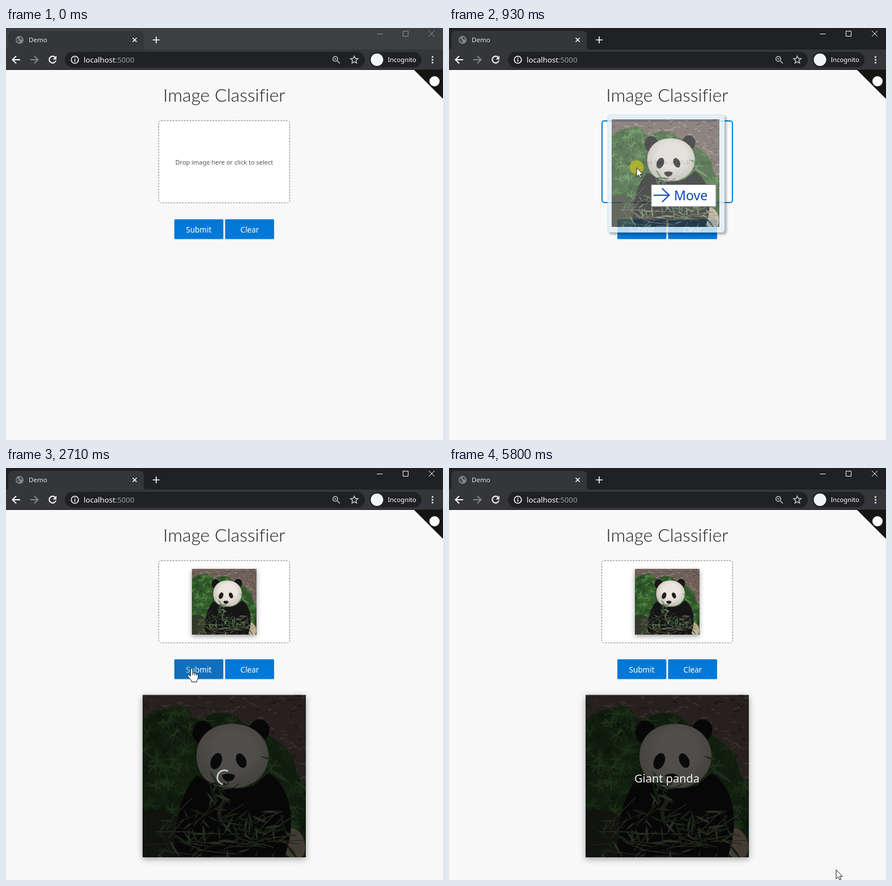
An HTML page for the animation above (5890 ms loop, 771 px wide and 727 px high).

```html
<!DOCTYPE html>
<html lang="en">
<head>
<meta charset="utf-8">
<title>Demo</title>
<style>
  html, body { margin: 0; width: 100%; height: 100%; overflow: hidden; background: #f8f8f8; }
  svg { display: block; font-family: "Noto Sans", "Open Sans", sans-serif; }
  .line { fill: none; stroke: #fff; stroke-width: 2; }
  .mid { text-anchor: middle; }
  .title { font: 300 32px Lato, "Open Sans", sans-serif; font-variant-ligatures: none; }
  .lift { filter: drop-shadow(0 3px 4px rgba(0,0,0,.38)); }
  .cursor { fill: #fff; stroke: #111; stroke-width: 1; stroke-linejoin: round; }
  #zone { box-sizing: border-box; height: 146px; border-radius: 5px; background: #fff; }
</style>
</head>
<body>
<svg width="771" height="727" viewBox="0 0 771 727">
  <defs>
    <clipPath id="bushClip"><path id="bush" d="M0 45Q15 25 42 26Q70 14 84 30Q90 50 112 38Q150 20 178 50Q215 65 232 78Q268 100 272 140L288 160V287H0Z"/></clipPath>
    <radialGradient id="fur" cx=".52" cy=".4" r=".62">
      <stop offset=".45" stop-color="#ebe6df"/>
      <stop offset="1" stop-color="#c2bab0"/>
    </radialGradient>
    <symbol id="photo" viewBox="0 0 288 287" preserveAspectRatio="none">
      <rect width="288" height="287" fill="#6f6159"/>
      <g id="mulch"></g>
      <use href="#bush" fill="#2f5429"/>
      <g id="needles" clip-path="url(#bushClip)"></g>
      <path d="M0 287V205Q40 195 75 225V287Z" fill="#33392a"/>
      <ellipse cx="266" cy="263" rx="20" ry="29" fill="#c4b199" transform="rotate(-18 266 263)"/>
      <path d="M96 142C72 165 54 215 57 287H250C270 240 268 165 222 138L196 160Q150 176 96 142Z" fill="#151517"/>
      <path d="M147 185Q130 200 138 222" fill="none" stroke="#5b5348" stroke-width="7"/>
      <ellipse cx="106" cy="66" rx="18" ry="21" fill="#171618"/>
      <ellipse cx="206" cy="62" rx="18" ry="19" fill="#171618"/>
      <path d="M95 110C94 73 122 51 158 51C197 51 222 76 222 108C222 139 196 165 157 165C120 165 97 145 95 110Z" fill="url(#fur)"/>
      <ellipse cx="130" cy="117" rx="9.500" ry="15" fill="#1f1d1e" transform="rotate(22 130 117)"/>
      <ellipse cx="174" cy="116" rx="8.500" ry="13.500" fill="#1f1d1e" transform="rotate(-24 174 116)"/>
      <path d="M140 142Q151 136 163 142Q162 152 151 153Q142 152 140 142Z" fill="#1d1b1b"/>
      <path d="M151 153V159M142 160Q157 170 170 157" fill="none" stroke="#75665d" stroke-width="2"/>
      <g id="leaves"></g>
    </symbol>
  </defs>

  <rect width="771" height="727" fill="#f8f8f8"/>

  <!-- browser window -->
  <rect id="titlebar" width="771" height="40"/>
  <path d="M0 38Q4 38 4 32V13Q4 5 12 5H235Q243 5 243 13V32Q243 38 248 38H771V74H0Z" fill="#35363a"/>
  <rect y="73" width="771" height="1" fill="#202124"/>
  <circle cx="24" cy="21" r="7" fill="#80868b"/>
  <path d="M19 18Q23 19 23 22Q25 23 23 26Q19 24 18.500 21ZM24 16Q28 16 29 20Q26 21 24 19Z" fill="#45474b"/>
  <text x="40" y="25" font-size="11.500" fill="#e4e6e8">Demo</text>
  <path class="line" style="stroke-width:1.6" d="M223.500 17.500l7 7m0-7l-7 7M259 21h12m-6-6v12"/>
  <path id="winButtons" fill="none" d="M654.500 10.500h10M700.500 5.500h9v9h-9zM746 5l10 10m0-10l-10 10"/>
  <path class="line" d="M25 56H12m6-6.500L11.500 56l6.500 6.500"/>
  <path class="line" style="stroke:#85878b" d="M43 56h13m-6-6.500l6.500 6.500-6.500 6.500"/>
  <path class="line" d="M87 52A6 6 0 1 0 88 57.500"/>
  <path d="M89 49v6.500h-6.500z" fill="#fff"/>
  <rect x="104" y="42" width="529" height="28" rx="14" fill="#202124"/>
  <circle class="line" style="stroke-width:1.6" cx="121.500" cy="56" r="6.300"/>
  <path class="line" style="stroke-width:1.6" d="M121.500 55v4.500m0-7.500v1.700"/>
  <text x="137" y="60.500" font-size="13.200" fill="#fff">localhost<tspan fill="#9aa0a6">:5000</tspan></text>
  <g class="line" style="stroke:#c4c7cb;stroke-width:1.5">
    <circle cx="581" cy="54.500" r="4.300"/>
    <path d="M584.500 58l4.500 4.500M579 54.500h4"/>
    <path d="M614.500 49.500l1.900 4.300 4.700.4-3.600 3.100 1.100 4.600-4.100-2.400-4.100 2.400 1.100-4.600-3.600-3.100 4.700-.4z"/>
  </g>
  <rect x="641" y="42.500" width="92" height="27" rx="13.500" fill="#202124"/>
  <circle cx="654.500" cy="56" r="11" fill="#f1f3f4"/>
  <text x="673.500" y="60" font-size="11.200" font-weight="500" fill="#fff">Incognito</text>
  <g fill="#fff"><circle cx="752.500" cy="51" r="1.600"/><circle cx="752.500" cy="56" r="1.600"/><circle cx="752.500" cy="61" r="1.600"/></g>

  <!-- page -->
  <path d="M720 74H771V125Z" fill="#151513"/>
  <circle cx="756" cy="94" r="9" fill="#fff"/>
  <text class="mid title" x="385" y="130" fill="#1b1b24">Image Classifier</text>
  <foreignObject x="269" y="163" width="232" height="146"><div id="zone"></div></foreignObject>
  <text id="hint" class="mid" x="385" y="241" font-size="11" fill="#555">Drop image here or click to select</text>
  <use id="thumb" class="lift" href="#photo" x="328" y="178" width="114" height="116"/>
  <rect id="submit" x="297" y="337.500" width="86.500" height="35" rx="1.500"/>
  <rect x="386.500" y="337.500" width="86.500" height="35" rx="1.500" fill="#0078d7"/>
  <g class="mid" font-size="13.500" fill="#fff">
    <text x="340" y="360.500">Submit</text>
    <text x="430" y="360.500">Clear</text>
  </g>
  <g id="result">
    <use style="filter:drop-shadow(0 3px 6px rgba(0,0,0,.35))" href="#photo" x="241" y="400.500" width="288" height="286.500"/>
    <rect id="shade" x="241" y="400.500" width="288" height="286.500" fill="rgba(0,0,0,.66)"/>
  </g>
  <circle id="spinner" cx="385.500" cy="546" r="12.600" fill="none" stroke="#ccc" stroke-width="2.700" pathLength="360"/>
  <text id="label" class="mid" x="384.500" y="554.500" font-size="20" fill="#f2f2f2">Giant panda</text>

  <!-- dragged picture -->
  <g id="ghost">
    <g opacity=".83">
      <rect width="206" height="207" rx="4" fill="#e2eff6" stroke="#bfe0f1" style="filter:drop-shadow(3px 3px 2px rgba(0,0,0,.4))"/>
      <use href="#photo" x="7" y="7.500" width="190" height="190"/>
      <rect x="7" y="7.500" width="190" height="190" fill="rgba(170,175,175,.16)"/>
    </g>
    <circle cx="51" cy="92" r="12.300" fill="#b3b62c" opacity=".9"/>
    <g font-size="23.200" fill="#0a46b8">
      <g id="copy">
        <rect x="77" y="123" width="107" height="38.500" fill="#fff" stroke="#888"/>
        <path d="M84 142h24m-12-12v24" stroke="#0a46b8" stroke-width="3"/>
        <text x="116" y="150">Copy</text>
      </g>
      <g id="move">
        <rect x="77" y="123" width="114" height="38.500" fill="#fff" stroke="#888"/>
        <path d="M81 141.500h27m-12-12l12.500 12-12.500 12" fill="none" stroke="#0a46b8" stroke-width="2"/>
        <text x="117" y="150">Move</text>
      </g>
    </g>
  </g>

  <circle id="click" cx="327" cy="356" r="11.500"/>
  <path id="arrow" class="cursor" d="M0 0V16L3.700 12.500L6.200 18L8.600 17L6.200 11.500H11Z"/>
  <g id="hand" class="cursor">
    <path d="M-2 2Q-2 0 0 0Q2 0 2 2V8Q5 7 5.500 9Q8 8 8.500 10Q11 9.500 11.500 12V16Q11 20 9 22V24H0V22Q-4 18 -7 13.500Q-8 11 -5.500 11Q-4 11.500 -2 14Z"/>
    <path d="M2 8v4M5.300 9v3.500M8.500 10v3" fill="none"/>
  </g>
</svg>
<script>
const $ = id => document.getElementById(id);
const show = (id, on) => $(id).style.display = on ? '' : 'none';
const place = (id, x, y) => $(id).setAttribute('transform', `translate(${x} ${y})`);
const attrs = (id, o) => { for (const k in o) $(id).setAttribute(k, o[k]); };

// Foliage and ground texture of the picture
let seed = 11;
const rnd = (a, b) => {
  seed = (seed * 16807) % 2147483647;
  return a + (b - a) * seed / 2147483647;
};
const ray = (x, y, a, len) =>
  `M${x.toFixed(1)} ${y.toFixed(1)}l${(len * Math.cos(a)).toFixed(1)} ${(len * Math.sin(a)).toFixed(1)}`;
const repeat = (n, make) => Array.from({ length: n }, make).join('');
const strokes = (id, color, width, d) =>
  $(id).innerHTML += `<path d="${d}" fill="none" stroke="${color}" stroke-width="${width}"/>`;

for (const c of ['#8d7d73', '#51453f', '#9c8e85', '#64544b'])
  strokes('mulch', c, 3, repeat(80, () => ray(rnd(0, 288), rnd(0, 170), rnd(-0.6, 0.9), rnd(5, 13))));
for (const c of ['#213f1e', '#447837', '#38672f', '#588c48'])
  strokes('needles', c, 1.5, repeat(48, () => {
    const x = rnd(0, 288), y = rnd(25, 240);
    return repeat(11, () => ray(x, y, rnd(0, 6.28), rnd(9, 17)));
  }));
for (const c of ['#7d734e', '#5c5a3c', '#958a62'])
  strokes('leaves', c, 1.3, repeat(12, () => ray(rnd(0, 230), rnd(215, 287), rnd(-0.9, 0.4), rnd(35, 80))));

function leaf(x, y, a, len) {
  const c = Math.cos(a) * len, s = Math.sin(a) * len, w = 0.13;
  const bend = k => `${x + c / 2 - s * k} ${y + s / 2 + c * k}`;
  return `M${x} ${y}Q${bend(w)} ${x + c} ${y + s}Q${bend(-w)} ${x} ${y}Z`;
}
const leaves = (color, d) => $('leaves').innerHTML += `<path d="${d}" fill="${color}"/>`;
for (const c of ['#4c6c42', '#708d63', '#3a5935'])
  leaves(c, repeat(28, () => leaf(rnd(20, 265), rnd(200, 280), rnd(-0.5, 2.6), rnd(18, 36)))
    + repeat(5, () => leaf(rnd(112, 138), rnd(150, 178), rnd(-0.3, 2.5), rnd(22, 34))));
leaves('#5d8a4c', leaf(207, 108, 0.3, 26) + leaf(222, 130, 0.6, 45) + leaf(117, 133, 1, 34));

// cubic-bezier(.4, 0, .2, 1)
function ease(x) {
  let lo = 0, hi = 1;
  for (let i = 0; i < 20; i++) {
    const u = (lo + hi) / 2, v = 1 - u;
    if (1.2 * u * v * v + 0.6 * u * u * v + u ** 3 < x) lo = u; else hi = u;
  }
  return lo * lo * (3 - 2 * lo);
}
const clamp = x => Math.min(1, Math.max(0, x));

function drawSpinner(t) {
  const p = Math.max(0, (t - 2345) / 1600) % 1;
  const e = ease(p * 2 % 1), grow = p < 0.5;
  const len = 8.2 + 261.8 * (grow ? e : 1 - e);
  attrs('spinner', {
    'stroke-dasharray': `${len} ${360 - len}`,
    'stroke-dashoffset': grow ? 0 : -270 * e,
    transform: `rotate(${450 * p} 385.5 546)`
  });
}

function draw(t) {
  const step = Math.floor((t + 10) / 77.4);
  const active = t >= 230, dropped = t >= 1330, busy = t >= 2320, left = t >= 5720;
  const dragging = active && !dropped;

  attrs('titlebar', { fill: active ? '#202124' : '#3c4043' });
  attrs('winButtons', { stroke: active ? '#fff' : '#93979b' });

  // drag: straight run, then slowing over the drop area
  const run = Math.min(step, 9) - 5, rest = Math.min(3, Math.max(0, step - 9));
  const gx = 132 + 32 * run + (rest && 8 + 4 * rest);
  const gy = 304.5 - 31 * run - (rest && 10.5 + 5.5 * rest);
  const over = dragging && gy + 92 < 309;
  show('ghost', dragging);
  place('ghost', gx, gy);
  show('copy', !over);
  show('move', over);

  // pointer
  let x = gx + 51, y = gy + 93;
  if (dropped) {
    const p = clamp((step - 21) / 8);
    x = 329.5 - 2 * p;
    y = 246 + 107.5 * p * p * (3 - 2 * p) - 2 * clamp((step - 37) / 8);
  }
  if (left) [x, y] = t < 5800 ? [512, 540] : [683, 709];
  const inZone = dropped && y < 309;
  const onSubmit = dropped && y >= 338 && y <= 372;
  const hand = inZone || onSubmit;
  show('hand', hand);
  show('arrow', active && !hand);
  place('hand', x, y);
  place('arrow', x, y);

  $('zone').style.border = over ? '2px solid #0078d7' : `1px dashed ${inZone ? '#0078d7' : '#777'}`;
  attrs('submit', { fill: onSubmit ? '#106ebe' : '#0078d7' });
  show('click', busy && !left);
  attrs('click', t < 2470 ? { fill: '#b3b62c', opacity: 0.8 } : { fill: '#0a84c4', opacity: 0.3 });

  show('hint', !dropped);
  show('thumb', dropped);
  show('result', dropped);
  show('shade', busy);
  show('spinner', busy && t < 5110);
  show('label', t >= 5110);
  drawSpinner(step * 77.5);
}

let start;
function tick(now) {
  start ??= now;
  draw((now - start) % 5890);
  requestAnimationFrame(tick);
}
draw(0);
requestAnimationFrame(tick);
</script>
</body>
</html>
```
